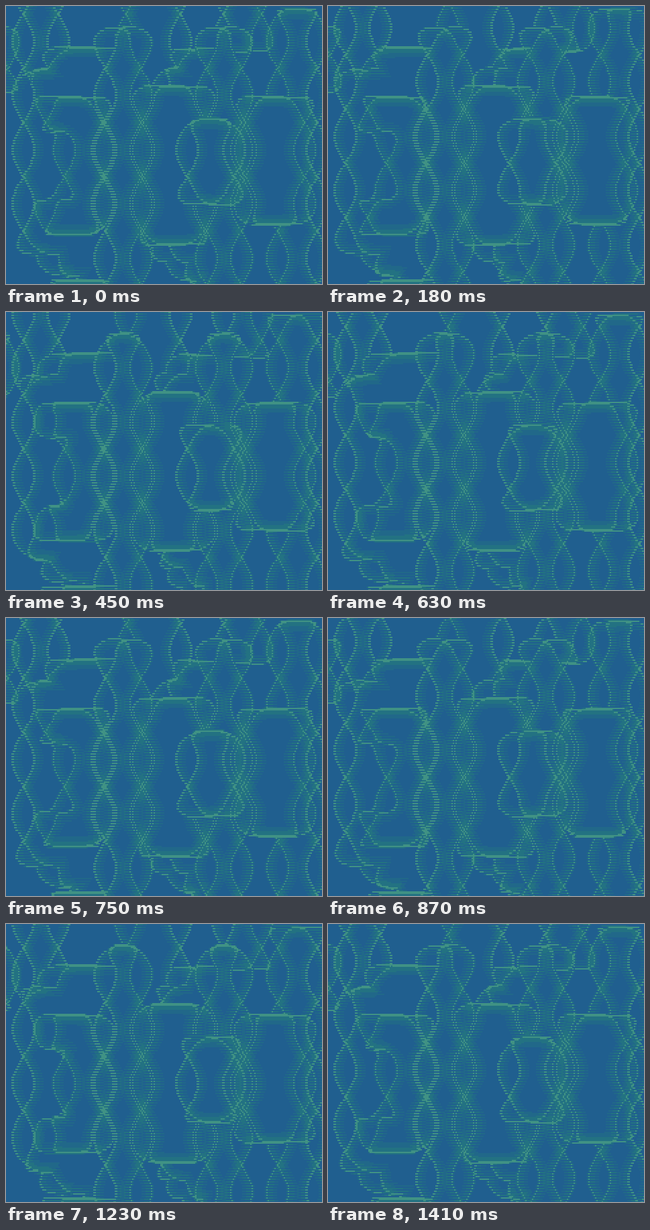
An HTML page with a canvas for the animation above (1.44 s loop, 471 by 415 pixels).

```html
<!DOCTYPE html>
<html lang="en">
<head>
<meta charset="utf-8">
<title>Interlaced waves</title>
<style>
html, body { margin: 0; width: 100%; height: 100%; overflow: hidden; background: #205f8f; }
canvas { display: block; width: 472px; height: 416px; image-rendering: pixelated; }
</style>
</head>
<body>
<canvas id="view" width="236" height="208"></canvas>
<script>
const W = 236, H = 208, CELL = 2;
const LOOP = 1440, STEP = 30;
const AMP = 8, WAVE = 81, NODE = 127;
const MAP_W = W + AMP * 2;
const FAR = 500;
const GLOW = [
  { depth: 17, level: 1 },
  { depth: 10, level: 2 },
  { depth: 3.4, level: 3 },
];
const COLORS = ['#205f8f', '#216889', '#237282', '#409284'];

// The still picture holds colour levels, with a margin for the sideways sway.
const map = document.createElement('canvas');
map.width = MAP_W;
map.height = H;
const pen = map.getContext('2d', { willReadFrequently: true });
pen.fillRect(0, 0, MAP_W, H);
pen.translate(AMP, 0);
pen.scale(1 / CELL, 1 / CELL);

// Fill a shape with the ground level and a stepped glow inside its edge.
function paint(path) {
  pen.save();
  pen.clip(path);
  pen.fill(path);
  for (const { depth, level } of GLOW) {
    const grey = level * 85;
    pen.lineWidth = depth * 2;
    pen.strokeStyle = `rgb(${grey},${grey},${grey})`;
    pen.stroke(path);
  }
  pen.restore();
}

function box(left, top, right, bottom, radius = 0) {
  const path = new Path2D();
  path.roundRect(left, top, right - left, bottom - top, radius);
  paint(path);
}

// A wide region whose left corners are cut into two rounded steps.
function hollow(left, top, right, bottom, w, h) {
  const path = new Path2D();
  path.moveTo(right, top);
  path.lineTo(left + w, top);
  for (let i = 1; i <= 2; i++) {
    const x = left + w * (1 - i / 2), y = top + h * i / 2;
    path.quadraticCurveTo(x, y - h / 2, x, y);
  }
  path.lineTo(left, bottom - h);
  for (let i = 1; i <= 2; i++) {
    const x = left + w * i / 2, y = bottom - h + h * i / 2;
    path.quadraticCurveTo(x - w / 2, y, x, y);
  }
  path.lineTo(left + w, FAR);
  path.lineTo(right, FAR);
  path.closePath();
  paint(path);
}

// A rounded box with a notch cut into the middle of its left side.
function notched(left, top, right, bottom, notch, radius) {
  const path = new Path2D();
  const y1 = top + 55, y2 = bottom - 55, inner = left + notch;
  const corners = [[right, top], [right, bottom], [left, bottom], [left, y2],
    [inner, y2], [inner, y1], [left, y1], [left, top]];
  path.moveTo((left + right) / 2, top);
  corners.forEach(([x, y], i) => {
    const [nx, ny] = corners[(i + 1) % corners.length];
    path.arcTo(x, y, nx, ny, Math.abs(x - inner) < notch + 1 ? radius / 2 : radius);
  });
  path.closePath();
  paint(path);
}

// hanging pillars
box(24, -50, 80, 130);
box(177, -50, 262, 150);
box(322, -50, 383, 70, 14);

// broad regions
box(-60, 30, 5, 130, 14);
hollow(24, 60, 190, 405, 74, 64);
box(68, 408, 190, FAR, 8);
hollow(230, 62, 335, 412, 46, 56);
box(403, 3, 466, FAR, 16);

// arches
box(146, 30, 203, FAR, 24);
box(203, 118, 297, 358, 22);
box(297, 30, 353, FAR, 24);

// counters
notched(57, 134, 146, 343, 28, 24);
box(268, 167, 342, 298, 24);
box(355, 134, 447, 328, 20);

const levels = pen.getImageData(0, 0, MAP_W, H).data;
const cells = new Uint8Array(MAP_W * H).map((_, i) => Math.round(levels[i * 4] / 85));

// Little-endian pixel value: alpha, blue, green, red.
const inks = COLORS.map(hex => {
  const n = parseInt(hex.slice(1), 16);
  return (255 << 24 | (n & 255) << 16 | n & 0xff00 | n >> 16) >>> 0;
});

const ctx = document.getElementById('view').getContext('2d');
const image = ctx.createImageData(W, H);
const pixels = new Uint32Array(image.data.buffer);

function draw(time) {
  const phase = Math.floor(time % LOOP / STEP) * STEP / LOOP;
  for (let y = 0; y < H; y++) {
    const sway = Math.round(AMP * Math.sin(2 * Math.PI * ((y - NODE) / WAVE + phase)));
    const from = y * MAP_W + AMP + (y % 2 ? sway : -sway);
    for (let x = 0; x < W; x++) pixels[y * W + x] = inks[cells[from + x]];
  }
  ctx.putImageData(image, 0, 0);
}

const start = performance.now();
function tick() {
  draw(performance.now() - start);
  requestAnimationFrame(tick);
}
tick();
</script>
</body>
</html>
```
